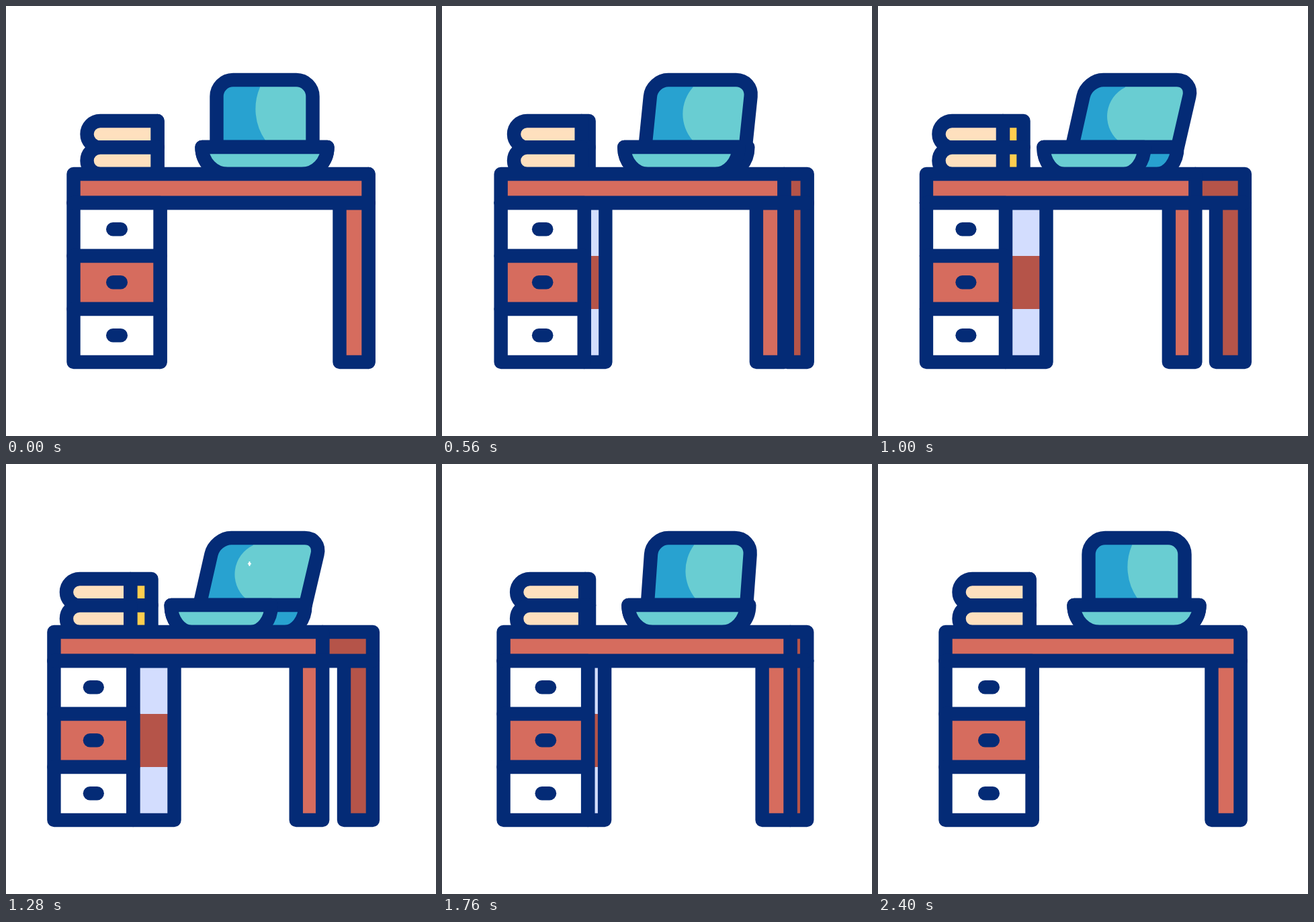
These frames come from a looping animation (640 by 640 pixels, 2640 ms). An HTML page with a canvas:

```html
<!DOCTYPE html>
<html lang="en">
<head>
<meta charset="utf-8">
<title>Turning desk</title>
<style>
  html, body { margin: 0; width: 100%; height: 100%; overflow: hidden; background: #fff; }
  canvas { display: block; width: 640px; height: 640px; }
</style>
</head>
<body>
<canvas id="stage" width="640" height="640"></canvas>
<script>
const ctx = document.getElementById('stage').getContext('2d');
const LOOP = 2640, STEP = 40, LINE = 20.4;
const NAVY = '#042b76', RED = '#d66c5e', DARK_RED = '#b55449', LILAC = '#d3ddfe',
      CREAM = '#fee0be', YELLOW = '#ffce4f', BLUE = '#28a2d0', TEAL = '#69cdd2', WHITE = '#fff';

const clamp = v => Math.min(1, Math.max(0, v));

// Steep start, long soft landing: cubic-bezier(.622, 0, .035, 1)
function ease(x) {
  x = clamp(x);
  let lo = 0, hi = 1;
  for (let i = 0; i < 30; i++) {
    const s = (lo + hi) / 2, q = 1 - s;
    if (3 * s * q * q * 0.622 + 3 * s * s * q * 0.035 + s * s * s < x) lo = s;
    else hi = s;
  }
  return lo * lo * (3 - 2 * lo);
}

const turnAt = t => 1.02 * (ease((t - 200) / 1000) - ease((t - 1320) / 1030));

// Edges on the far side do not move in proportion to the turn
const KEYS = [0, 0.056, 0.318, 0.808, 0.93, 1];
const FAR = {
  desk: [539.5, 539.8, 543.3, 544.8, 545.8, 545.9],
  leg: [539.5, 535.5, 518, 502.5, 503, 503],
  cabinet: [229.5, 229.7, 242.3, 246.2, 250.3, 250.5],
  spine: [225.5, 223, 219, 217.7, 217, 216.5],
  laptop: [478.5, 476, 457, 451, 446, 445.5]
};
function far(name, p) {
  const v = FAR[name];
  let i = 0;
  while (i < KEYS.length - 2 && p > KEYS[i + 1]) i++;
  return v[i] + (v[i + 1] - v[i]) * clamp((p - KEYS[i]) / (KEYS[i + 1] - KEYS[i]));
}

function paint(path, fill, line = NAVY) {
  if (fill) { ctx.fillStyle = fill; ctx.fill(path); }
  if (line) { ctx.strokeStyle = line; ctx.stroke(path); }
}
function box(x1, x2, y1, y2, fill, line) {
  const path = new Path2D();
  path.rect(x1, y1, x2 - x1, y2 - y1);
  paint(path, fill, line);
}
function bar(x1, y1, x2, y2, line) {
  paint(new Path2D(`M${x1} ${y1}L${x2} ${y2}`), null, line);
}

function drawScreen(p) {
  const top = 110, bottom = 210, tl = 313.5 - 2.5 * p, tr = 456.5 + 12.5 * p,
        bl = 313.5 - 24.8 * p, br = 456.5 - 10.5 * p, r = 24.5, k = r * 0.448;
  const left = d => `${tl + (bl - tl) * d / 100} ${top + d}`;
  const right = d => `${tr + (br - tr) * d / 100} ${top + d}`;
  const frame = new Path2D(
    `M${bl} ${bottom}L${left(r)}C${left(k)} ${tl + k} ${top} ${tl + r} ${top}` +
    `H${tr - r}C${tr - k} ${top} ${right(k)} ${right(r)}L${br} ${bottom}Z`);

  const xt = 378 - 10 * p, xb = 386 - 29 * p, sag = 10.3 + 10.7 * p;
  const radius = (39.8 * 39.8 + sag * sag) / (2 * sag);
  const shine = new Path2D(
    `M${xt} 105V121A${radius} ${radius} 0 0 0 ${xb} 200V212H500V105Z`);
  paint(frame, BLUE, null);
  ctx.save();
  ctx.clip(frame);
  paint(shine, TEAL, null);
  ctx.restore();
  paint(frame);
}

function bowl(l, r, curve, fill) {
  const k = curve * 0.45;
  paint(new Path2D(
    `M${l} 210H${r}C${r} 232 ${r - k} 250 ${r - curve} 250` +
    `H${l + curve}C${l + k} 250 ${l} 232 ${l} 210Z`), fill);
}

function drawLaptop(p) {
  drawScreen(p);
  const l = 291.5 - 45 * p, r = 478.5 - 82 * p, curve = (r - l) / 187 * 38.5;
  bowl(l, far('laptop', p), curve, BLUE);
  bowl(l, r, curve, TEAL);
}

function drawPlus(t, p) {
  const size = ease((t - 1240) / 160) * (1 - ease((t - 1600) / 120));
  if (size < 0.01) return;
  const x = 363.5 + 12 * (0.93 - p), y = 148.5;
  ctx.save();
  ctx.lineWidth = 20.8 * size;
  bar(x, y - 23 * size, x, y + 23 * size, WHITE);
  bar(x - 15 * size, y, x + 15 * size, y, WHITE);
  ctx.restore();
}

function drawBooks(p) {
  const l = 120.5 - 30 * p, s = 225.5 - 39.5 * p, r = 19.75;
  for (const y of [171, 210.5]) {
    box(s, far('spine', p), y, y + 2 * r, YELLOW);
    paint(new Path2D(
      `M${s} ${y}H${l + r}A${r} ${r} 0 0 0 ${l + r} ${y + 2 * r}H${s}Z`), CREAM);
  }
}

function drawDesk(p) {
  const l = 100.5 - 28.5 * p, r = 539.5 - 67 * p,
        cab = 229.5 - 39.5 * p, leg = 496.5 - 63.5 * p,
        back = far('desk', p), cabBack = far('cabinet', p);
  const rows = [293, 372, 451, 530];

  // Side faces
  box(far('leg', p), back, 293, 530, DARK_RED);
  box(r, back, 250, 293, DARK_RED);
  for (let i = 0; i < 3; i++)
    box(cab, cabBack, rows[i], rows[i + 1], i === 1 ? DARK_RED : LILAC, 'transparent');
  box(cab, cabBack, 293, 530);

  // Front faces
  box(leg, r, 293, 530, RED);
  box(l, r, 250, 293, RED);
  const knob = 165 - 34 * p, half = 5.8 - 0.4 * p;
  for (let i = 0; i < 3; i++) {
    box(l, cab, rows[i], rows[i + 1], i === 1 ? RED : WHITE);
    const y = rows[i] + 39.3;
    bar(knob - half, y, knob + half, y);
  }
  bar(l, 293, back, 293);
}

function draw(now) {
  const t = Math.floor(now % LOOP / STEP) * STEP;
  const p = t < 240 || t >= 2400 ? 0 : turnAt(t);
  ctx.fillStyle = WHITE;
  ctx.fillRect(0, 0, 640, 640);
  ctx.lineWidth = LINE;
  ctx.lineJoin = ctx.lineCap = 'round';
  drawLaptop(p);
  drawPlus(t, p);
  drawBooks(p);
  drawDesk(p);
}

let start;
function tick(now) {
  start ??= now;
  draw(now - start);
  requestAnimationFrame(tick);
}
draw(0);
requestAnimationFrame(tick);
</script>
</body>
</html>
```
